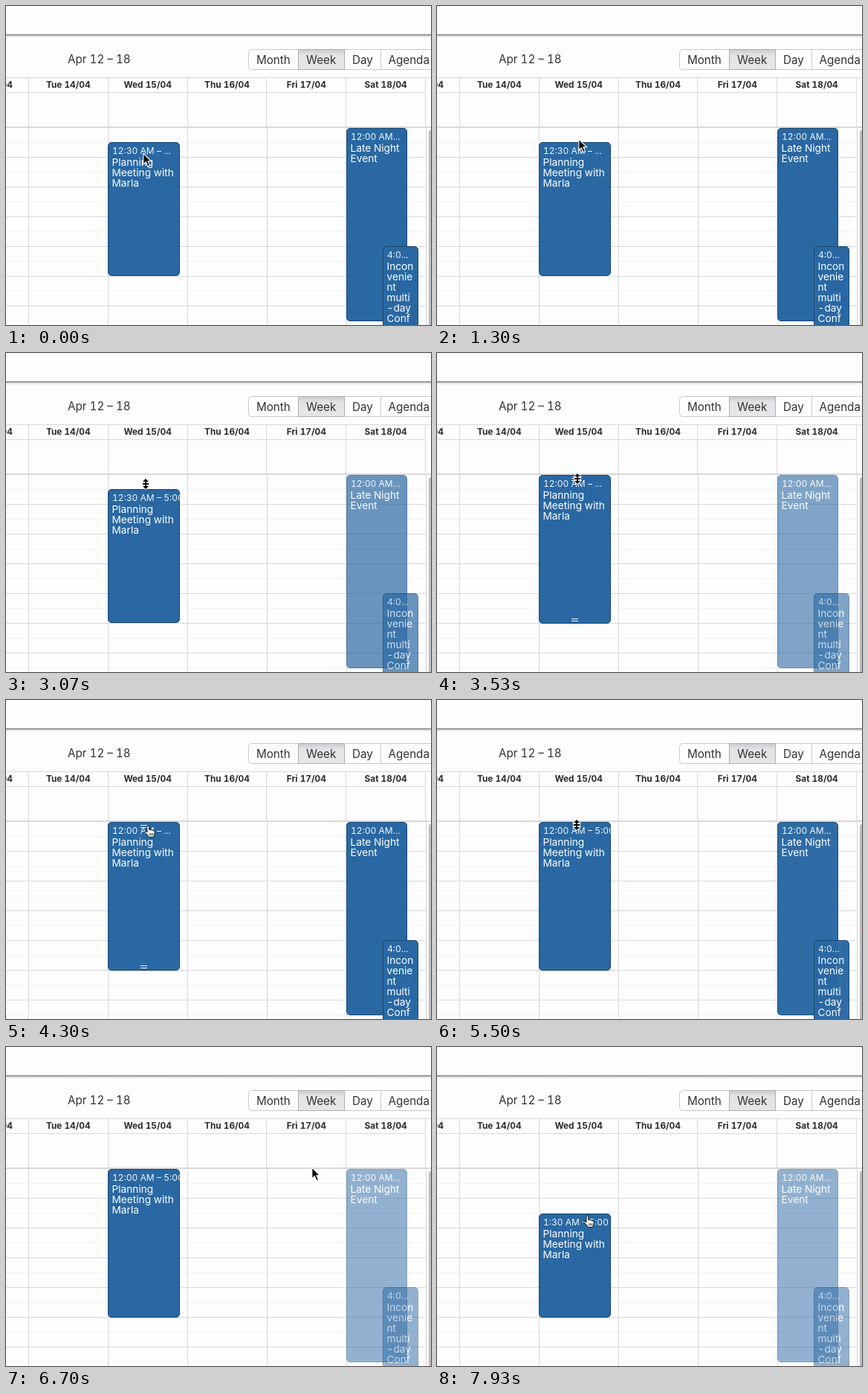
These frames come from a looping animation (572x429 px, 8000 ms). An HTML page:

```html
<!DOCTYPE html>
<html lang="en">
<head>
<meta charset="utf-8">
<title>Week calendar</title>
<style>
  html, body { margin: 0; width: 100%; height: 100%; overflow: hidden; background: #fefdfe; }
  svg { display: block; width: 100vw; height: 100vh; font-family: Inter, Roboto, sans-serif; font-variant-numeric: tabular-nums; }
  .bar { font-size: 15.2px; fill: #303234; }
  .day { font-size: 11.8px; font-weight: 700; fill: #2b2b2d; text-anchor: middle; }
  .time { font-size: 12px; fill: #f3f7fb; }
  .title { font-size: 13.7px; fill: #fff; }
  .box { fill: #2968a3; stroke: #1a456f; }
</style>
</head>
<body>
<svg viewBox="0 0 572 429" preserveAspectRatio="none">
  <defs>
    <linearGradient id="press" x2="0" y2="1">
      <stop offset="0" stop-color="#cbcbcd"/>
      <stop offset=".3" stop-color="#e4e4e6"/>
      <stop offset="1" stop-color="#e6e6e8"/>
    </linearGradient>
    <linearGradient id="fade" x2="0" y2="1">
      <stop offset="0" stop-color="#d0d0d3"/>
      <stop offset="1" stop-color="#fefdfe"/>
    </linearGradient>
    <clipPath id="clip"><rect x="138" y="0" width="95.5" height="429"/></clipPath>
  </defs>
  <rect width="572" height="429" fill="#fefdfe"/>
  <rect y="39" width="572" height="4" fill="url(#fade)"/>
  <rect y="38" width="572" height="1.5" fill="#88888c"/>
  <g id="toolbar"></g>
  <g id="grid"></g>
  <g id="events"></g>
  <g id="cursor"></g>
</svg>
<script>
const LOOP = 8000, FADE = 170, TOP = 164, SLOT = 20;
const $ = id => document.getElementById(id);

function set(el, attrs) {
  for (const k in attrs) el.setAttribute(k, attrs[k]);
}
function add(parent, tag, attrs, text) {
  const el = document.createElementNS('http://www.w3.org/2000/svg', tag);
  set(el, attrs);
  if (text) el.textContent = text;
  return parent.appendChild(el);
}
const line = (parent, d, stroke, width = 1) =>
  add(parent, 'path', { d, stroke, 'stroke-width': width, fill: 'none' });

function buildToolbar() {
  const g = $('toolbar');
  add(g, 'text', { x: 83, y: 77, class: 'bar' }, 'Apr 12 – 18');
  add(g, 'rect', { x: 326.5, y: 58.5, width: 270, height: 27, rx: 4, fill: '#fefdfe', stroke: '#c9c9cc' });
  line(g, 'M504.5 59V85', '#c9c9cc');
  add(g, 'rect', { x: 393.5, y: 58.5, width: 62, height: 27, fill: 'url(#press)', stroke: '#adadb0' });
  [['Month', 337], ['Week', 404], ['Day', 466], ['Agenda', 514.5]]
    .forEach(([name, x]) => add(g, 'text', { x, y: 77.5, class: 'bar' }, name));
}

function buildGrid() {
  const g = $('grid'), rule = '#d8d7db';
  for (let y = TOP + SLOT - .5, minor = true; y < 429; y += SLOT, minor = !minor)
    line(g, `M0 ${y}H565`, minor ? '#f3f2f4' : rule);
  line(g, 'M0 96.5H572M0 116.5H565', rule);
  line(g, 'M0 163H572', rule, 2);
  ['Mon', 'Tue', 'Wed', 'Thu', 'Fri', 'Sat'].forEach((name, i) => {
    const head = 30.3 + 106.85 * i;
    line(g, `M${Math.floor(head) + .5} 96V163M${30.5 + 107 * i} 163V429`, rule);
    add(g, 'text', { x: head - 53.4, y: 110, class: 'day' }, `${name} ${13 + i}/04`);
  });
  add(g, 'rect', { x: 569, y: 167, width: 7, height: 280, rx: 3, fill: '#bdbcbf' });
}

function addEvent(x, y, w, h, time, lines) {
  const g = add($('events'), 'g', {});
  const box = add(g, 'rect', { x: x + .5, y: y + .5, width: w, height: h, rx: 4.5, class: 'box' });
  const clip = add(g, 'g', {});
  const text = add(clip, 'g', { transform: `translate(${x} ${y})` });
  const label = add(text, 'text', { x: 6, y: 16, class: 'time' }, time);
  lines.forEach((s, i) => add(text, 'text', { x: 5.5, y: 32 + 14 * i, class: 'title' }, s));
  return { g, box, clip, text, label };
}

function buildCursors() {
  const make = () => add($('cursor'), 'g', {});
  const arrow = make(), hand = make(), resize = make();
  add(arrow, 'path', {
    d: 'M.6 1V14.8L3.8 11.8 6.2 17.3 8.6 16.3 6.2 10.9H10.4Z',
    transform: 'translate(-.8 -1) scale(1.08)', fill: '#050505', stroke: '#fff'
  });
  add(hand, 'path', {
    d: 'M4 10L3.9 2.4Q4 .8 5.2 .8 6.5 .8 6.6 2.4L6.8 6.6Q8.6 5.6 9.4 7 11 6.2 11.8 7.7 14 7.2 14.3 9.5' +
       'L13.9 12.5 12.6 16.3H6Q5 14 3.5 12.5L.9 9.9Q.4 8.4 1.8 8.2 3 8.4 4 10Z',
    transform: 'translate(-5 -1)', fill: '#fff', stroke: '#0a0a0a', 'stroke-linejoin': 'round'
  });
  line(hand, 'M2.6 10v3.4M4.6 10v3.4M6.6 10v3.4', '#222', .9);
  add(resize, 'path', {
    d: 'M0-7L4-3H1V-1H4V1H1V3H4L0 7-4 3H-1V1H-4V-1H-1V-3H-4Z',
    fill: '#050505', stroke: '#fff', 'stroke-width': 1.8, 'paint-order': 'stroke'
  });
  return { arrow, hand, resize };
}

// Pointer moves: start, end, x, y
const moves = [
  [700, 1400, 191, 179], [1530, 2370, 185, 190], [2370, 2700, 187, 188],
  [2970, 3330, 189, 169], [3970, 4030, 188, 177], [4170, 4300, 191, 169],
  [4500, 4730, 190, 172], [5000, 5130, 188, 168], [5500, 5850, 191, 145],
  [6470, 6700, 412, 162], [6900, 7070, 163, 222], [7300, 7930, 202, 227]
];
const drags = [[2970, 3500], [5490, LOOP]];

const clamp = v => Math.min(1, Math.max(0, v));
const easeOut = p => 1 - (1 - p) ** 3;
const dragging = t => drags.some(([a, b]) => t >= a && t < b);
const slotAt = t => t < 3170 ? 1 : t < 7300 ? 0 : 3;

function pointer(t) {
  const pos = moves.reduce(([x, y], [a, b, toX, toY]) => {
    const p = easeOut(clamp((t - a) / (b - a)));
    return [x + (toX - x) * p, y + (toY - y) * p];
  }, [185, 198]);
  // The last drag swings left, then right
  pos[0] -= 85 * Math.sin(2 * Math.PI * clamp((t - 7300) / 630));
  return pos.map(Math.round);
}

function shapeAt(t, x, y, top) {
  const over = x >= 137 && x <= 234 && y > top - 12;
  if (t < 1530 || !over) return 'arrow';
  return x > 180 && x <= 190 && y < top + 12 ? 'resize' : 'hand';
}

// Each drag fades the other events out, each drop fades them in
const opacityAt = t => drags.reduce((o, [a, b]) =>
  o - .5 * (clamp((t - a) / FADE) - clamp((t - b) / FADE)), 1);

function timeText(slot, full) {
  const hour = Math.floor(slot / 2) || 12;
  return `${hour}:${slot % 2 ? '30' : '00'} AM – ${full ? '5:00' : '...'}`;
}

buildToolbar();
buildGrid();
const meeting = addEvent(137, 183, 96, 179, '', ['Planning', 'Meeting with', 'Marla']);
meeting.clip.setAttribute('clip-path', 'url(#clip)');
const grips = [0, 1].map(() => line(meeting.g, 'M181 .5h9m-9 3h9', '#f4f8fc'));
const others = [
  addEvent(458, 164, 81, 259, '12:00 AM...', ['Late Night', 'Event']),
  addEvent(507, 323, 47, 140, '4:0...', ['Incon', 'venie', 'nt', 'multi', '-day', 'Conf'])
];
const cursors = buildCursors();

function draw(t) {
  const slot = slotAt(t), drag = dragging(t);
  const top = TOP + slot * SLOT - slot % 2 * (slot === 1), end = slot === 1 ? 362 : 363;
  set(meeting.box, { y: top + .5, height: end - top });
  meeting.text.setAttribute('transform', `translate(137 ${top})`);
  meeting.label.textContent = timeText(slot, drag);
  const visibility = t >= 1530 && !drag ? 'visible' : 'hidden';
  [top + 4, end - 6].forEach((y, i) => set(grips[i], { visibility, transform: `translate(0 ${y})` }));

  others.forEach(e => e.g.setAttribute('opacity', opacityAt(t)));

  const [x, y] = pointer(t), shape = shapeAt(t, x, y, top);
  $('cursor').setAttribute('transform', `translate(${x} ${y})`);
  for (const name in cursors) cursors[name].setAttribute('display', name === shape ? 'inline' : 'none');
}

const start = performance.now();
function tick() {
  draw((performance.now() - start) % LOOP);
  requestAnimationFrame(tick);
}
tick();
</script>
</body>
</html>
```
